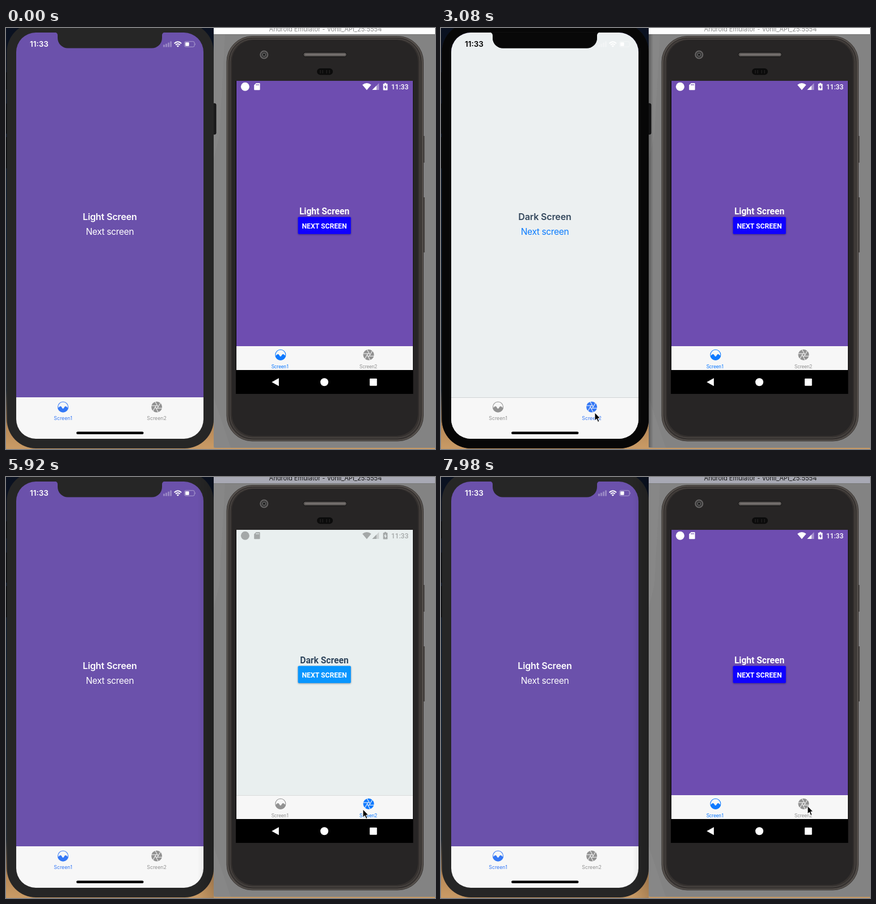
These frames come from a looping animation (756 by 741 pixels, 8000 ms). An HTML page:

```html
<!DOCTYPE html>
<html lang="en">
<head>
<meta charset="utf-8">
<title>Status bar per tab</title>
<style>
html, body { margin: 0; width: 100%; height: 100%; overflow: hidden; background: #0c1626; }
svg { display: block; width: 756px; height: 741px; }
text { text-anchor: middle; fill: currentColor; white-space: pre; }
.ios text { font-family: Inter, "Open Sans", sans-serif; }
.droid text { font-family: Roboto, "Open Sans", sans-serif; }
.droid .bar { font: 11.1px Inter, "Open Sans", sans-serif; }
.ios .title { font-size: 16px; font-weight: 600; letter-spacing: -.15px; }
.ios .link { font-size: 15.5px; letter-spacing: -.35px; }
.ios .clock { font-size: 13.5px; font-weight: 600; }
.ios .tab { font-size: 8.8px; color: #929292; }
.ios .on { color: #3478f6; }
.droid .title { font-size: 15.6px; font-weight: 700; }
.droid .link { font-size: 12.2px; font-weight: 600; color: #fff; }
.droid .clock { font-size: 12.1px; font-weight: 500; }
.droid .tab { font-size: 8.6px; color: #929292; }
.droid .on { color: #0f7aff; }
.button { filter: drop-shadow(0 1px 1.5px rgba(0, 0, 0, .35)); }

/* all states switch hard; 1% is 80 ms */
.ios-dark, .droid-dark, .ios-front, .droid-front, .droid-back, .ios-icons, .droid-icons, .cursor {
  animation: 8s step-end infinite;
}
.ios-dark { animation-name: ios-dark; }
.droid-dark { animation-name: droid-dark; }
.ios-front { animation-name: ios-front; }
.droid-front { animation-name: droid-front; }
.droid-back { animation-name: droid-back; }
.ios-icons { animation-name: ios-icons; }
.droid-icons { animation-name: droid-icons; }
.cursor { animation-name: cursor; }

@keyframes ios-dark {
  0%, 28.875%, 50.25%, 100% { opacity: 0; }
  14.375%, 38.5% { opacity: 1; }
}
@keyframes droid-dark {
  0%, 87.875%, 100% { opacity: 0; }
  74% { opacity: 1; }
}
@keyframes ios-front {
  0%, 58.5%, 100% { opacity: 0; }
  14.375% { opacity: 1; }
}
@keyframes droid-front {
  0% { opacity: 0; }
  58.5%, 100% { opacity: 1; }
}
@keyframes droid-back {
  0% { opacity: 1; }
  58.5%, 100% { opacity: 0; }
}
@keyframes ios-icons {
  0%, 30.25%, 51.75%, 100% { color: #fff; }
  14.375% { color: #929595; }
  16.625%, 40.75% { color: #000; }
  28.875%, 50.25% { color: #d5cce8; }
}
@keyframes droid-icons {
  0%, 87.875%, 100% { color: #fff; }
  74% { color: #a4a8a8; }
  75.5% { color: #5f6364; }
}
@keyframes cursor {
  0% { transform: translate(-50px, 0); }
  6.25% { transform: translate(244px, 718px); }
  8.5% { transform: translate(252px, 700px); }
  10% { transform: translate(260px, 680px); }
  11.375% { transform: translate(261px, 669px); }
  18.5% { transform: translate(253px, 669px); }
  20% { transform: translate(222px, 669px); }
  21.25% { transform: translate(176px, 669px); }
  22.75% { transform: translate(132px, 669px); }
  24% { transform: translate(104px, 669px); }
  25.125% { transform: translate(96px, 669px); }
  30.25% { transform: translate(163px, 675px); }
  32.125% { transform: translate(238px, 675px); }
  34% { transform: translate(262px, 677px); }
  35.5% { transform: translate(271px, 677px); }
  40.75% { transform: translate(266px, 676px); }
  42.625% { transform: translate(208px, 674px); }
  44.125% { transform: translate(124px, 672px); }
  45.5% { transform: translate(90px, 671px); }
  51.75% { transform: translate(127px, 672px); }
  53.625% { transform: translate(435px, 620px); }
  55.5% { transform: translate(462px, 589px); }
  57% { transform: translate(464px, 583px); }
  58.5% { transform: translate(464px, 581px); }
  61.5% { transform: translate(468px, 582px); }
  63.75% { transform: translate(484px, 582px); }
  65.25% { transform: translate(521px, 580px); }
  66.75% { transform: translate(566px, 580px); }
  68.25% { transform: translate(604px, 582px); }
  69.625% { transform: translate(622px, 584px); }
  71.125% { transform: translate(629px, 585px); }
  75.5% { transform: translate(642px, 585px); }
  77.375% { transform: translate(618px, 585px); }
  78.875% { transform: translate(570px, 585px); }
  80.375% { transform: translate(518px, 586px); }
  81.875% { transform: translate(474px, 587px); }
  83.375% { transform: translate(455px, 588px); }
  84.875% { transform: translate(448px, 588px); }
  89.375% { transform: translate(462px, 587px); }
  90.875% { transform: translate(508px, 584px); }
  92.375% { transform: translate(568px, 581px); }
  93.875% { transform: translate(618px, 580px); }
  95.25% { transform: translate(640px, 579px); }
  96.75%, 100% { transform: translate(646px, 579px); }
}
</style>
</head>
<body>
<svg viewBox="0 0 756 741">
  <defs>
    <linearGradient id="wall" x2="0" y2="1">
      <stop offset="0" stop-color="#0a1120"/>
      <stop offset=".5" stop-color="#0e2036"/>
      <stop offset=".86" stop-color="#25303c"/>
      <stop offset=".95" stop-color="#b98a58"/>
      <stop offset="1" stop-color="#c99b66"/>
    </linearGradient>
    <linearGradient id="shade">
      <stop offset="0" stop-opacity="0"/>
      <stop offset="1" stop-opacity=".14"/>
    </linearGradient>
    <linearGradient id="edge">
      <stop offset="0" stop-opacity=".3"/>
      <stop offset="1" stop-opacity="0"/>
    </linearGradient>
    <clipPath id="glass"><rect x="18" y="8" width="330" height="715" rx="34.5"/></clipPath>
    <g id="wave">
      <circle r="9" fill="none" stroke="currentColor" stroke-width="1.1"/>
      <path fill="currentColor" d="M-9.2 2C-7.5 1.5-6.5-1.2-4.4-1.2S-1.8 3 0 3S2.4-1.2 4.4-1.2S7.5 1.5 9.2 2A9.4 9.4 0 0 1-9.2 2Z"/>
    </g>
    <path id="blade" d="M1.3-2.2H-9.3" stroke="#f7f7f7" stroke-width="1.05"/>
    <g id="shutter">
      <circle r="9.5" fill="currentColor"/>
      <use href="#blade"/>
      <use href="#blade" transform="rotate(60)"/>
      <use href="#blade" transform="rotate(120)"/>
      <use href="#blade" transform="rotate(180)"/>
      <use href="#blade" transform="rotate(240)"/>
      <use href="#blade" transform="rotate(300)"/>
    </g>
  </defs>

  <rect width="756" height="741" fill="url(#wall)"/>

  <!-- emulator window -->
  <g class="droid">
    <path d="M366 0H756V739H370Q366 739 366 735Z" fill="#838383"/>
    <path d="M366 11H386L376 190L366 230ZM366 650L396 739H366Z" fill="#8a8a8a" opacity=".6"/>
    <path d="M366 0H756V11H366Z" fill="#fdfdfd"/>
    <text class="bar" x="563" y="6.4" color="#8b8b8b">Android Emulator - Vonil_API_25:5554</text>
    <g class="droid-front">
      <path d="M366 0H756V11H366Z" fill="#a8a9b4"/>
      <text class="bar" x="563" y="6.4" color="#141414">Android Emulator - Vonil_API_25:5554</text>
    </g>
    <path d="M366 11.3H756" stroke="#707070" stroke-width=".6"/>

    <path d="M734 190H737.6V237H734ZM734 298H738V395H734Z" fill="#4a4644"/>
    <rect x="389" y="14.5" width="346.5" height="712.5" rx="45" fill="#55504c" stroke="#3a3634"/>
    <rect x="392.5" y="17.5" width="339.5" height="706.5" rx="42" fill="#393533" stroke="#302c2b"/>
    <rect x="395" y="19.5" width="334.5" height="701.5" rx="40" fill="#35312f" stroke="#57524e" stroke-width=".8"/>
    <rect x="398" y="21" width="328" height="697" rx="38" fill="#272525"/>
    <circle cx="454.8" cy="47" r="6.6" fill="#3b3a3a" stroke="#696767" stroke-width="1.8"/>
    <circle cx="454.8" cy="47" r="2.6" fill="#191919" stroke="#777" stroke-width="1"/>
    <rect x="523.8" y="43" width="76.6" height="7.6" rx="3.8" fill="#5a5654" stroke="#111"/>
    <path d="M528 46.8H597" stroke="#777270" stroke-width="2.4" stroke-linecap="round"/>
    <rect x="548" y="71" width="28" height="11.5" rx="5.7" fill="#0b0b0b"/>
    <path d="M554 74V80M558 74V80M565 74V80M570 74V80" stroke="#2c2b2b"/>
    <path d="M405 93H717.5V644H405Z"/>

    <path d="M406 93H717V560H406Z" fill="#6e4db0"/>
    <text class="title" x="561" y="328" color="#fff">Light Screen</text>
    <rect class="button" x="514.5" y="332.5" width="93.3" height="30.3" rx="1.8" fill="#1000ff"/>
    <text class="link" x="561" y="352.7">NEXT SCREEN</text>
    <path d="M406 560H717V602H406Z" fill="#f7f7f7"/>
    <g class="tab on"><use href="#wave" x="483.8" y="575.3"/><text x="483.3" y="598.5">Screen1</text></g>
    <g class="tab"><use href="#shutter" x="639" y="575.3"/><text x="638.6" y="598.5">Screen2</text></g>

    <g class="droid-dark">
      <path d="M406 93H717V560H406Z" fill="#e9efef"/>
      <text class="title" x="561" y="328" color="#2f455c">Dark Screen</text>
      <rect class="button" x="514.5" y="332.5" width="93.3" height="30.3" rx="1.8" fill="#0896ff"/>
      <text class="link" x="561" y="352.7">NEXT SCREEN</text>
      <path d="M406 560H717V602H406Z" fill="#f7f7f7"/>
      <path d="M406 560.5H717" stroke="#d2d5d6" stroke-width=".8"/>
      <g class="tab"><use href="#wave" x="483.8" y="575.3"/><text x="483.3" y="598.5">Screen1</text></g>
      <g class="tab on"><use href="#shutter" x="639" y="575.3"/><text x="638.6" y="598.5">Screen2</text></g>
    </g>

    <g class="droid-icons" fill="currentColor">
      <circle cx="421.4" cy="103.2" r="7.5"/>
      <path fill-rule="evenodd" d="M440.8 97H446.6Q447.6 97 447.6 98V108.2Q447.6 109.2 446.6 109.2H438.2Q437.2 109.2 437.2 108.2V100.6ZM440.6 98.7V101H441.7V98.7ZM442.6 98.7V101H443.7V98.7ZM444.6 98.7V101H445.7V98.7Z"/>
      <path d="M628 100Q635.8 94 643.6 100L635.8 109.3Z"/>
      <path d="M657.3 97V109H645.3Z" opacity=".4"/>
      <path d="M652.8 101.5V109H645.3Z"/>
      <path fill-rule="evenodd" d="M667 96.8H670V98H671.6Q672.4 98 672.4 98.8V108.8Q672.4 109.6 671.6 109.6H665.4Q664.6 109.6 664.6 108.8V98.8Q664.6 98 665.4 98H667ZM669 99.8L666 104.6H668V108L671 103.2H669Z"/>
      <text class="clock" x="694" y="107.8">11:33</text>
    </g>
    <g fill="#fff">
      <path d="M468.3 623.2L480.8 616.2V630.2Z"/>
      <circle cx="561" cy="623.2" r="7"/>
      <rect x="640.9" y="616.9" width="12.8" height="12.8" rx="1"/>
    </g>
  </g>

  <!-- phone on the left -->
  <g class="ios">
    <g class="droid-back">
      <rect x="362" y="133" width="8" height="54" rx="2" fill="#1b1b1c" stroke="#0c0c0d"/>
    </g>
    <rect class="ios-front" x="366" y="11" width="8" height="727" fill="url(#edge)"/>
    <path d="M0 78H3V108H0ZM0 133H3V186H0ZM0 192H3V247H0Z" fill="#05080d"/>
    <rect x="1.5" y="-9" width="364.5" height="749" rx="51" fill="#262626"/>
    <rect class="ios-front" x="1.5" y="-9" width="364.5" height="749" rx="51" fill="#070707"/>

    <g clip-path="url(#glass)">
      <path d="M18 8H348V650H18Z" fill="#6b51ab"/>
      <path d="M18 650H348V723H18Z" fill="#f7f7f7"/>
      <g color="#fff">
        <text class="clock" x="58.5" y="33">11:33</text>
        <text class="title" x="183" y="337.7">Light Screen</text>
        <text class="link" x="183" y="363.8">Next screen</text>
      </g>
      <g class="tab on"><use href="#wave" x="100.5" y="667"/><text x="100.5" y="690">Screen1</text></g>
      <g class="tab"><use href="#shutter" x="265.6" y="667"/><text x="265.6" y="690">Screen2</text></g>

      <g class="ios-dark">
        <path d="M18 8H348V650H18Z" fill="#ecf0f1"/>
        <path d="M18 650H348V723H18Z" fill="#f7f7f7"/>
        <path d="M18 650.5H348" stroke="#cdd0d1" stroke-width=".9"/>
        <text class="clock" x="58.5" y="33" color="#000">11:33</text>
        <text class="title" x="183" y="337.7" color="#33475c">Dark Screen</text>
        <text class="link" x="183" y="363.8" color="#0a7bff">Next screen</text>
        <g class="tab"><use href="#wave" x="100.5" y="667"/><text x="100.5" y="690">Screen1</text></g>
        <g class="tab on"><use href="#shutter" x="265.6" y="667"/><text x="265.6" y="690">Screen2</text></g>
      </g>

      <g class="ios-icons" fill="currentColor">
        <path d="M277 29.5H280V33.5H277ZM281 27.8H284V33.5H281ZM285 25.8H288V33.5H285ZM289 23.5H292V33.5H289Z" opacity=".3"/>
        <g fill="none" stroke="currentColor" stroke-width="2">
          <path d="M296.6 27.2Q302.8 21.4 309 27.2"/>
          <path d="M299 29.8Q302.8 26.3 306.6 29.8"/>
        </g>
        <path d="M300.6 31.4Q302.8 29.6 305 31.4L302.8 33.7Z"/>
        <rect x="314.5" y="23.8" width="17.6" height="9.4" rx="2.4" fill="none" stroke="currentColor" opacity=".45"/>
        <path d="M333.3 26.8Q335 28.5 333.3 30.2Z" opacity=".5"/>
        <rect x="316" y="25.3" width="6.6" height="6.4" rx="1"/>
      </g>
      <rect x="124" y="710.5" width="118.5" height="4.6" rx="2.3"/>
    </g>

    <path id="notch" d="M86 7.5H280A5 5 0 0 0 275 13V17.5A18 18 0 0 1 257 35.5H109A18 18 0 0 1 91 17.5V13A5 5 0 0 0 86 7.5Z" fill="#262626"/>
    <use class="ios-front" href="#notch" style="filter: brightness(.2)"/>
    <rect class="droid-front" x="338" y="0" width="28" height="741" fill="url(#shade)"/>
  </g>

  <path class="cursor" d="M0 0V14L3.2 11L5.6 16.4L7.9 15.4L5.6 10.2L9.4 9.8Z" stroke="#fff" stroke-width=".9"/>
</svg>
</body>
</html>
```
